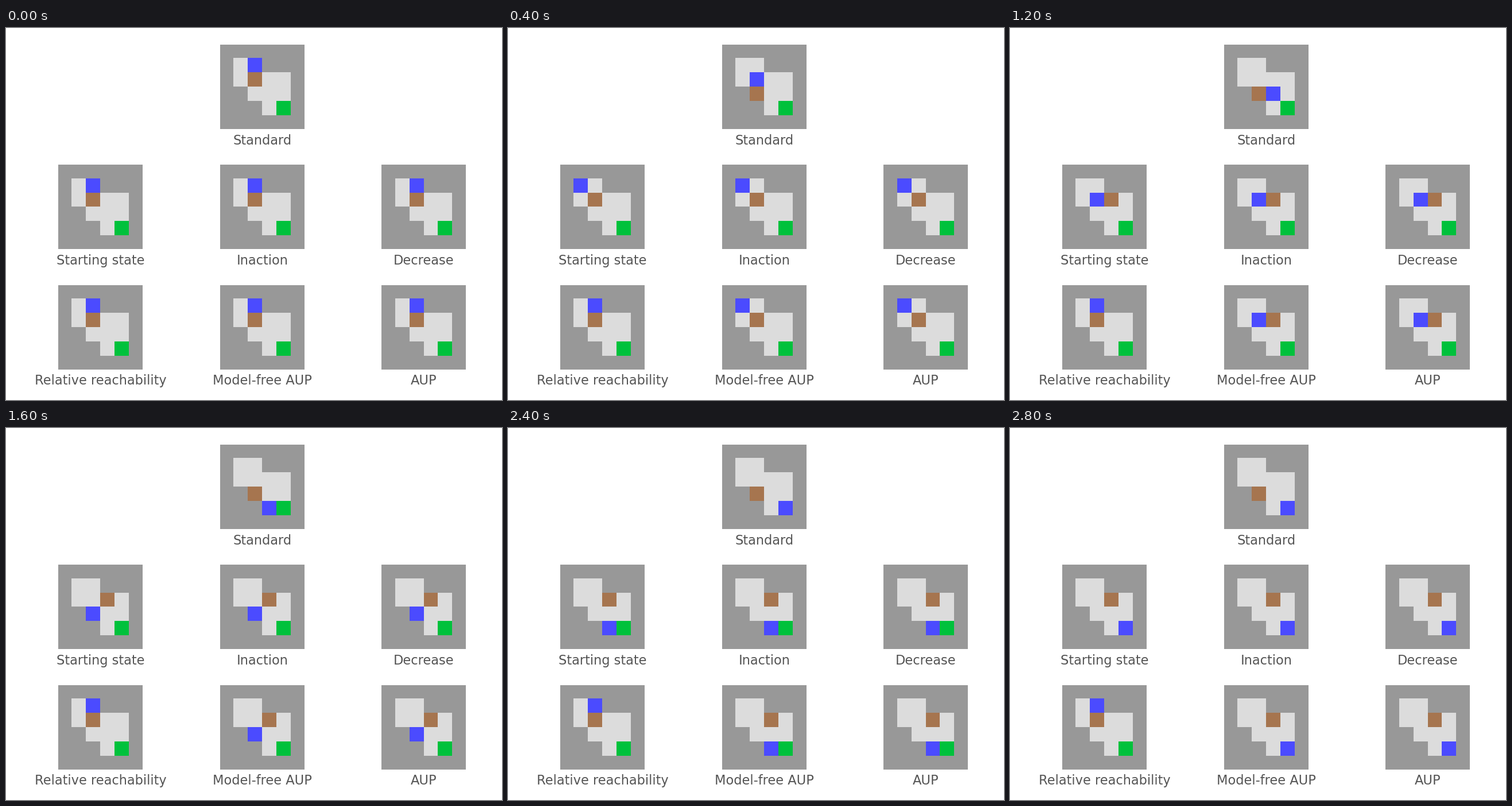
A matplotlib script that plays this animation: 864 by 648 pixels, repeating every 4000 ms.

```python
import matplotlib.pyplot as plt
from matplotlib.animation import FuncAnimation
from matplotlib.patches import Rectangle

W, H, DPI = 864, 648, 135
WALL, FLOOR = "#989898", "#dcdcdc"
AGENT, BOX, GOAL = "#4b4bff", "#a6754f", "#00c13c"
CELL = 24.9

# Floor runs as (row, first column, last column)
ROOMS = [(1, 1, 2), (2, 1, 4), (3, 2, 4), (4, 3, 4)]
GOAL_CELL, BOX_START = (4, 4), (2, 2)

# Agent routes as (row, column) per step; each ends by staying put
DIRECT = [(1, 2), (2, 2), (2, 3), (3, 3), (4, 3), (4, 4)]
CAREFUL = [(1, 2), (1, 1), (2, 1), (2, 2), (3, 2), (3, 3), (4, 3), (4, 4)]
IDLE = [(1, 2)]

PANELS = [
    ("Standard", 0, 1, DIRECT),
    ("Starting state", 1, 0, CAREFUL),
    ("Inaction", 1, 1, CAREFUL),
    ("Decrease", 1, 2, CAREFUL),
    ("Relative reachability", 2, 0, IDLE),
    ("Model-free AUP", 2, 1, CAREFUL),
    ("AUP", 2, 2, CAREFUL),
]

fig = plt.figure(figsize=(W / DPI, H / DPI), dpi=DPI, facecolor="white")
ax = fig.add_axes([0, 0, 1, 1])
ax.set_xlim(0, W)
ax.set_ylim(H, 0)
ax.axis("off")


def block(x0, y0, x1, y1, color):
    """Add a rectangle with edges on whole pixels."""
    x0, y0, x1, y1 = (round(v) for v in (x0, y0, x1, y1))
    return ax.add_patch(Rectangle((x0, y0), x1 - x0, y1 - y0, facecolor=color,
                                  edgecolor="none", antialiased=False))


class Panel:
    def __init__(self, name, row, col, route):
        self.x = 89.45 + 281.7 * col
        self.y = 27.4 + 209.35 * row
        self.route = route
        size = 6 * CELL
        block(self.x + 1.6, self.y + 1.6,
              self.x + size - 0.8, self.y + size - 0.8, WALL)
        for r, first, last in ROOMS:
            self.run(r, first, last, FLOOR)
        self.run(GOAL_CELL[0], GOAL_CELL[1], GOAL_CELL[1], GOAL)
        self.box = self.run(BOX_START[0], BOX_START[1], BOX_START[1], BOX)
        self.agent = self.run(route[0][0], route[0][1], route[0][1], AGENT)
        ax.text(165 + 281.2 * col, 202.8 + 209.2 * row, name, fontsize=12,
                family="DejaVu Sans", color="#555555",
                ha="center", va="baseline")

    def run(self, r, first, last, color):
        return block(self.x + first * CELL, self.y + r * CELL,
                     self.x + (last + 1) * CELL, self.y + (r + 1) * CELL, color)

    def place(self, patch, cell):
        r, c = cell
        x0, x1 = round(self.x + c * CELL), round(self.x + (c + 1) * CELL)
        y0, y1 = round(self.y + r * CELL), round(self.y + (r + 1) * CELL)
        patch.set_bounds(x0, y0, x1 - x0, y1 - y0)

    def show(self, step):
        path = self.route[:step + 1]
        box = BOX_START
        # Stepping onto the box pushes it one cell onward
        for a, b in zip(path, path[1:]):
            if b == box:
                box = (2 * b[0] - a[0], 2 * b[1] - a[1])
        self.place(self.box, box)
        self.place(self.agent, path[-1])


panels = [Panel(*spec) for spec in PANELS]


def update(step):
    for panel in panels:
        panel.show(step)
    return [p for panel in panels for p in (panel.box, panel.agent)]


anim = FuncAnimation(fig, update, frames=10, interval=400,
                     repeat=True, repeat_delay=0, blit=False)
plt.show()
```
